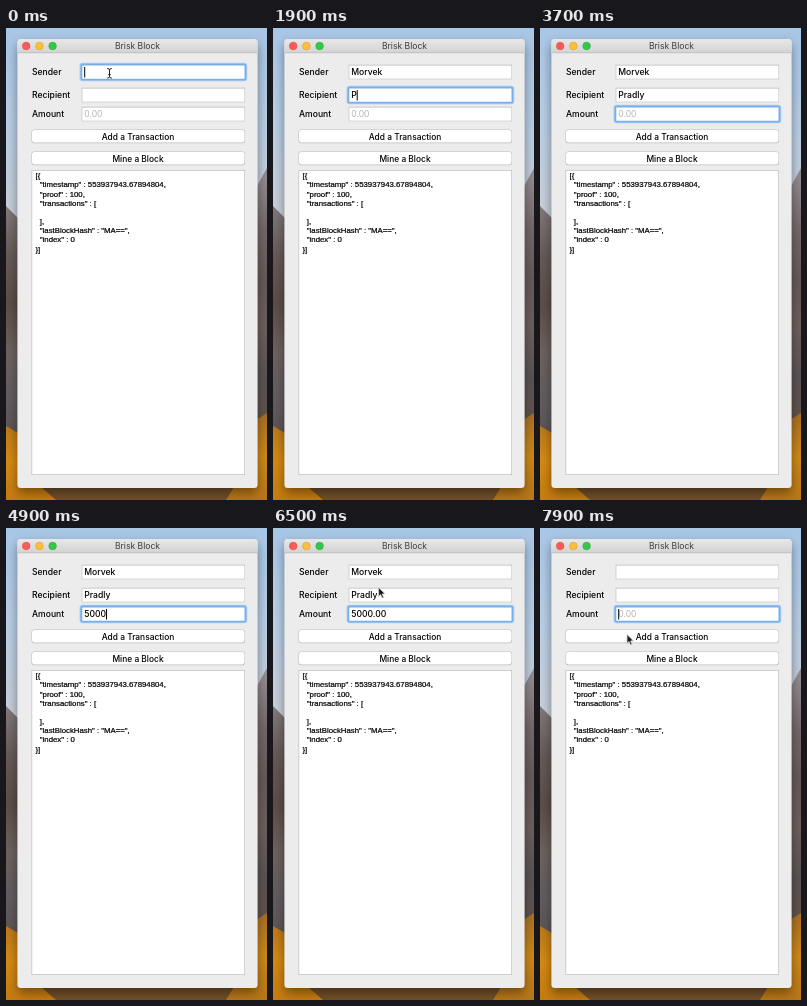
Write an HTML page with a canvas that moves like this. It is 261x472 px and loops after 8 s.

```html
<!DOCTYPE html>
<html lang="en">
<head>
<meta charset="utf-8">
<title>Ledger window</title>
<style>
html, body { margin: 0; width: 100%; height: 100%; overflow: hidden; background: #a9bfd6; }
canvas { display: block; width: 261px; height: 472px; }
</style>
</head>
<body>
<canvas id="stage"></canvas>
<script>
const W = 261, H = 472, LOOP = 8000;
const UI = 'Inter, "Open Sans", sans-serif';
const BODY = '"Liberation Sans", Arial, sans-serif';
const canvas = document.getElementById('stage');
const dpr = window.devicePixelRatio || 1;
canvas.width = W * dpr;
canvas.height = H * dpr;
const c = canvas.getContext('2d');

const FIELDS = [
  { label: 'Sender', y: 37 },
  { label: 'Recipient', y: 60 },
  { label: 'Amount', y: 79, hint: '0.00' }
];
const JSON_LINES = [
  '[{', '  "timestamp" : 553937943.67894804,', '  "proof" : 100,',
  '  "transactions" : [', '', '  ],', '  "lastBlockHash" : "MA==",',
  '  "index" : 0', '}]'
];

// Typing: text and time of each key, one entry per field
const TYPED = [
  { text: 'Morvek', keys: [650, 800, 930, 1060, 1200, 1340] },
  { text: 'Pradly', keys: [1850, 2050, 2240, 2430, 2620, 2800] },
  { text: '5000', keys: [4300, 4450, 4600, 4750] }
];
const TABS = [0, 1600, 3100];
const COMMIT = 5900, CLEAR = 7500;
const INPUTS = [...TABS, ...TYPED.flatMap(e => e.keys), COMMIT, CLEAR].sort((a, b) => a - b);

// Pointer path: time, x, y
const PATH = [[6100, 103, 46], [6500, 105.6, 59.5], [7150, 87, 106.5]];

function box(x, y, w, h, r, fill) {
  c.beginPath();
  c.roundRect(x, y, w, h, r);
  c.fillStyle = fill;
  c.fill();
}

function text(s, x, y, { size = 8.6, color = '#000', font = UI, align = 'left', weight = 500 } = {}) {
  c.font = `${weight} ${size}px ${font}`;
  c.textAlign = align;
  c.fillStyle = color;
  c.fillText(s, x, y);
}

function fade(y0, y1, ...colors) {
  const g = c.createLinearGradient(0, y0, 0, y1);
  colors.forEach((color, i) => g.addColorStop(i / (colors.length - 1), color));
  return g;
}

function shape(fill, ...points) {
  c.beginPath();
  points.forEach(([x, y]) => c.lineTo(x, y));
  c.closePath();
  c.fillStyle = fill;
  c.fill();
}

// Sky, two ridges and autumn trees
function wallpaper() {
  c.fillStyle = fade(0, 190, '#a8c6e6', '#b9cfe6', '#c9cfd8');
  c.fillRect(0, 0, W, H);
  shape(fade(180, 420, '#80787a', '#665a57', '#5c4d47', '#6d625e', '#625c60', '#5a5250'),
    [0, 178], [12, 190], [130, 260], [130, H], [0, H]);
  shape(fade(150, 400, '#938b90', '#75696a', '#665a5a', '#6c605c', '#5b5354', '#62534a'),
    [W, 140], [250, 160], [130, 260], [130, H], [W, H]);
  shape(fade(395, H, '#b9761c', '#d58b12', '#c57b10'),
    [0, 398], [12, 405], [55, H], [0, H]);
  shape(fade(385, H, '#a86f25', '#cf8a18', '#b87618'),
    [W, 385], [250, 392], [215, H], [W, H]);
  shape('#74502a', [35, 459], [228, 459], [220, H], [50, H]);
}

function windowFrame() {
  c.save();
  c.shadowColor = 'rgba(0,0,0,.42)';
  c.shadowBlur = 11 * dpr;
  c.shadowOffsetY = 5 * dpr;
  box(11.4, 11, 240.2, 449, 3.5, '#ececec');
  c.restore();
  box(11.4, 11, 240.2, 14, [3.5, 3.5, 0, 0], fade(11, 25, '#e8e8e8', '#d2d2d2'));
  c.fillStyle = '#b9b9b9';
  c.fillRect(11.4, 24.5, 240.2, 0.7);
  [['#fc5b57', '#df4744'], ['#fdbd3e', '#dfa023'], ['#34c84a', '#27a936']].forEach(([fill, rim], i) => {
    c.beginPath();
    c.arc(20.2 + 13.2 * i, 18, 3.8, 0, 7);
    c.fillStyle = fill;
    c.fill();
    c.strokeStyle = rim;
    c.lineWidth = 0.6;
    c.stroke();
  });
  text('Brisk Block', 131.5, 21, { color: '#3c3c3c', align: 'center', weight: 400 });
}

function button(label, y) {
  box(25.5, y, 213.5, 13.8, 2.8, '#bdbdbd');
  box(26, y + 0.4, 212.5, 12.6, 2.4, '#fff');
  text(label, 132, y + 10, { size: 8.4, align: 'center' });
}

function field(f, value, focused, caret) {
  text(f.label, 26, f.y + 10.2);
  if (focused) {
    box(73.6, f.y - 2.3, 167.6, 18.6, 3, '#a2c8f2');
    box(74.6, f.y - 1.3, 165.6, 16.6, 2, '#78afea');
  } else {
    box(75.7, f.y - 0.3, 163.3, 14.6, 0, '#b8b8b8');
  }
  box(76.3, f.y + 0.4, 162.2, 13.4, 0, '#fff');
  if (value) text(value, 78.2, f.y + 10.4);
  else if (f.hint) text(f.hint, 78.2, f.y + 10.4, { color: '#b4b4b4', weight: 400 });
  if (focused && caret) {
    c.font = `500 8.6px ${UI}`;
    c.fillStyle = '#000';
    c.fillRect(78.2 + c.measureText(value).width, f.y + 2, 1, 10.5);
  }
}

function output() {
  box(25.5, 142, 213.5, 305, 0, '#bfbfbf');
  box(26.2, 142.7, 212.1, 303.6, 0, '#fff');
  c.strokeStyle = '#000';
  c.lineWidth = 0.22;
  JSON_LINES.forEach((line, i) => {
    const y = 150.3 + 9.15 * i;
    text(line, 29.5, y, { size: 7.8, font: BODY, weight: 400 });
    c.strokeText(line, 29.5, y);
  });
}

function beam(x, y) {
  c.beginPath();
  c.moveTo(x - 2.3, y - 4.5);
  c.quadraticCurveTo(x, y - 4.5, x, y - 3);
  c.quadraticCurveTo(x, y - 4.5, x + 2.3, y - 4.5);
  c.moveTo(x, y - 3);
  c.lineTo(x, y + 3.5);
  c.moveTo(x - 2.3, y + 5);
  c.quadraticCurveTo(x, y + 5, x, y + 3.5);
  c.quadraticCurveTo(x, y + 5, x + 2.3, y + 5);
  c.moveTo(x - 1.3, y + 1.7);
  c.lineTo(x + 1.3, y + 1.7);
  c.strokeStyle = '#222';
  c.lineWidth = 1;
  c.stroke();
}

function arrow(x, y) {
  const outline = [[0, 0], [0, 9], [2, 7.1], [3.5, 10.5], [5, 9.9], [3.6, 6.5], [6.4, 6.3]];
  const points = outline.map(([dx, dy]) => [x + dx, y + dy]);
  shape('#1c1917', ...points);
  c.lineJoin = 'round';
  c.lineWidth = 0.8;
  c.strokeStyle = '#d8d5d2';
  c.stroke();
}

function pointer(t) {
  if (t < TYPED[0].keys[0]) return beam(103.5, 45);
  if (t < PATH[0][0]) return;
  let i = 0;
  while (i < PATH.length - 2 && t > PATH[i + 1][0]) i++;
  const [a, b] = [PATH[i], PATH[i + 1]];
  const k = Math.min(1, (t - a[0]) / (b[0] - a[0]));
  const e = k * k * (3 - 2 * k);
  arrow(a[1] + (b[1] - a[1]) * e, a[2] + (b[2] - a[2]) * e);
}

function valueAt(i, t) {
  if (t >= CLEAR) return '';
  if (i === 2 && t >= COMMIT) return '5000.00';
  const e = TYPED[i];
  return e.text.slice(0, e.keys.filter(k => k <= t).length);
}

function draw(t) {
  c.setTransform(dpr, 0, 0, dpr, 0, 0);
  wallpaper();
  windowFrame();
  const focus = TABS.filter(k => k <= t).length - 1;
  const last = INPUTS.filter(k => k <= t).pop();
  const caret = (t - last) % 1000 < 500 && !(t >= COMMIT && t < CLEAR);
  FIELDS.forEach((f, i) => field(f, valueAt(i, t), i === focus, caret));
  button('Add a Transaction', 101.5);
  button('Mine a Block', 123.5);
  output();
  pointer(t);
}

const start = performance.now();
function tick() {
  draw((performance.now() - start) % LOOP);
  requestAnimationFrame(tick);
}
tick();
</script>
</body>
</html>
```
